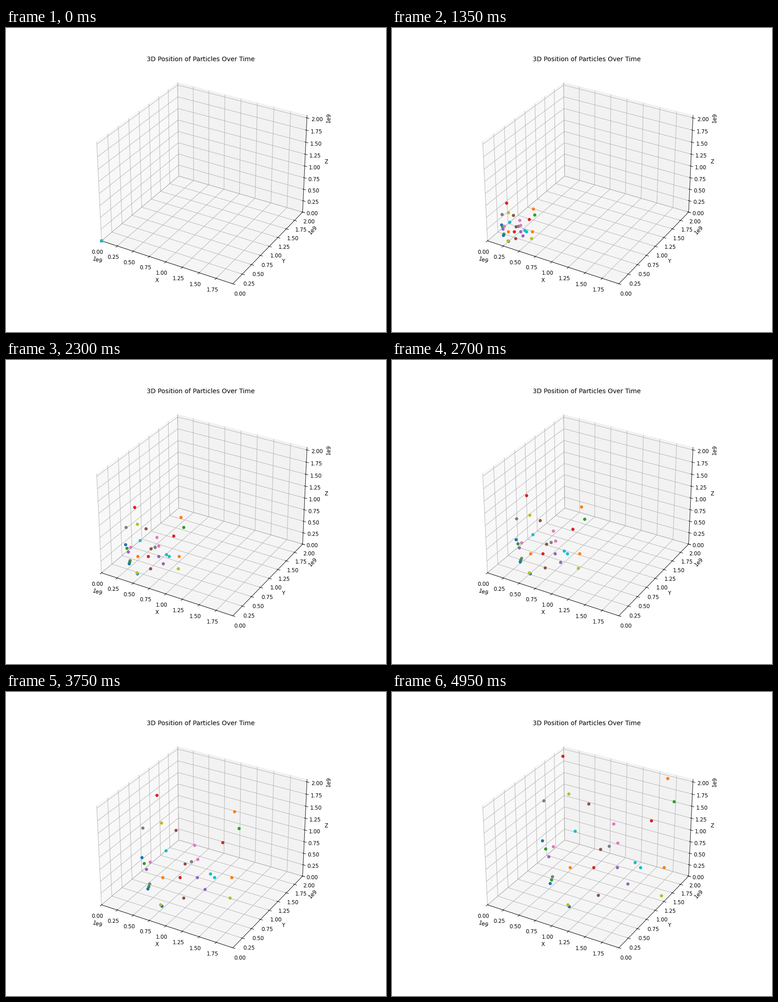
Recreate the animation shown at these times as a matplotlib script. Size 837 by 669 pixels, loop 5 s.

```python
import matplotlib.pyplot as plt
import numpy as np
from matplotlib.animation import FuncAnimation
from matplotlib.lines import Line2D

W, H, DPI = 837, 669, 83.7
FRAMES = 100
START = np.array([210.3, 468.4])  # the (0, 0, 0) corner on screen
RATE = 0.095  # how strongly the paths gain speed towards the viewer

# Particles end up evenly spaced on straight strands:
# colour cycle digits, first and last end point on screen
STRANDS = [
    ("024", (331, 327), (344.5, 362.5)),
    ("720", (353, 406), (348, 421)),
    ("13491", (392, 386), (599, 386)),
    ("576", (458.5, 346), (497, 332.5)),
    ("266", (620.5, 241), (354.5, 340)),
    ("75", (333.5, 239.5), (432.5, 246.5)),
    ("054", (390, 472), (518.5, 422.5)),
    ("88", (386.5, 468), (593, 448)),
    ("389", (375.5, 141), (402.5, 306.5)),
    ("139", (607, 190), (534.5, 375.5)),
]

# The small surplus keeps the pixel size from rounding down
fig = plt.figure(figsize=((W + 1e-6) / DPI, (H + 1e-6) / DPI), dpi=DPI)
ax = fig.add_subplot(projection="3d")
ax.set(xlim=(0, 1.991e9), ylim=(0, 2.001e9), zlim=(0, 2.051e9),
       xlabel="X", ylabel="Y", zlabel="Z",
       title="3D Position of Particles Over Time")


def make_dot(digit):
    dot = Line2D([], [], marker="o", markersize=5, linestyle="none",
                 color=f"C{digit}", transform=fig.transFigure)
    return fig.add_artist(dot)


dots = [make_dot(digit) for digits, *_ in STRANDS for digit in digits]
ends = np.vstack([np.linspace(first, last, len(digits))
                  for digits, first, last in STRANDS])


def progress(s):
    """Share of each screen path covered after share s of the time."""
    return s * (1 - RATE) / (1 - s * RATE)


def update(frame):
    points = START + progress(frame / (FRAMES - 1)) * (ends - START)
    for dot, (x, y) in zip(dots, points):
        dot.set_data([x / W], [1 - y / H])
    return dots


anim = FuncAnimation(fig, update, frames=FRAMES, interval=50,
                     init_func=lambda: update(0), repeat=True)
plt.show()
```
